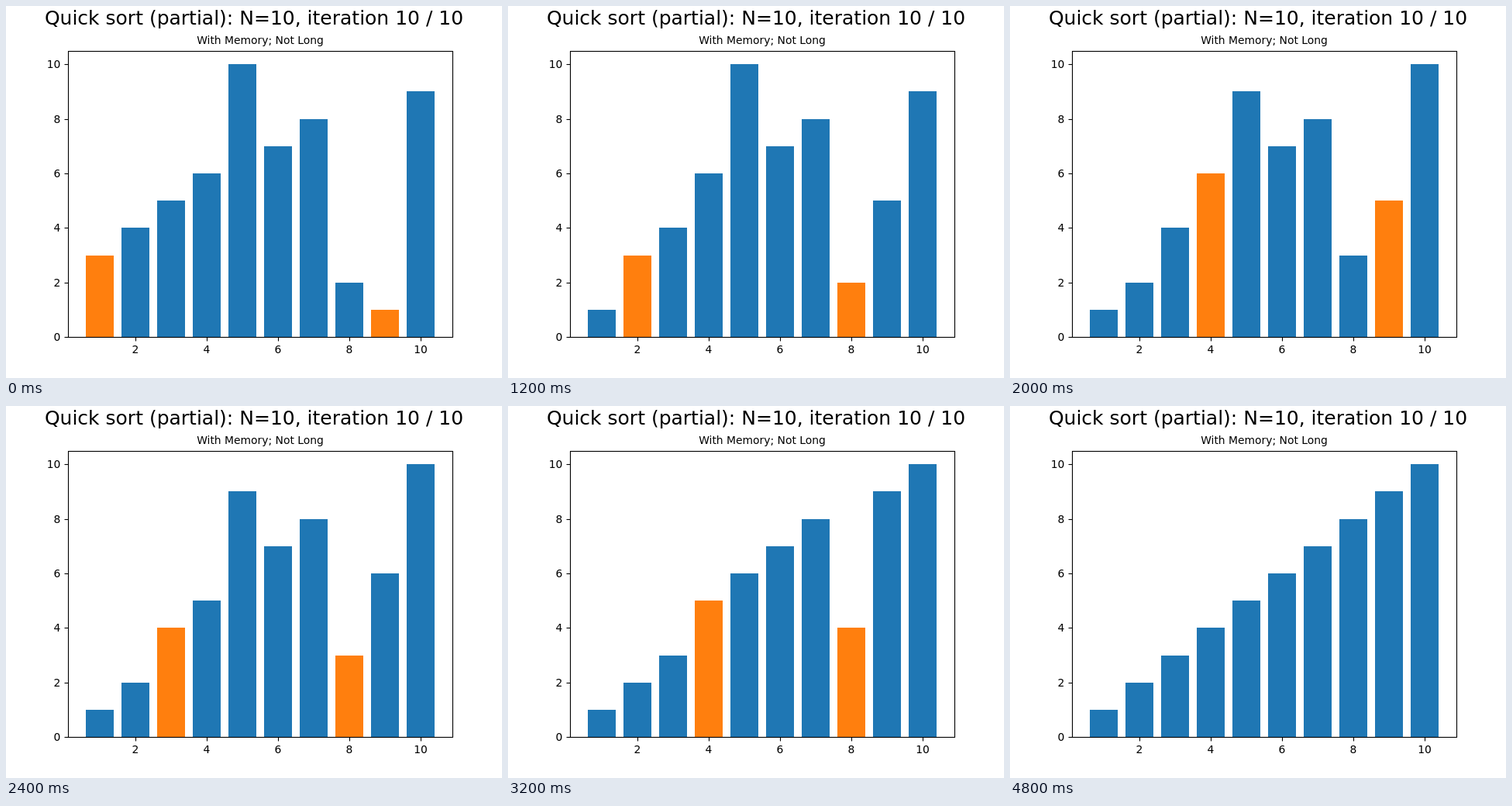
An HTML page with a canvas that plays this animation: 640 by 480 pixels, repeating every 5.2 s.

```html
<!DOCTYPE html>
<html lang="en">
<head>
<meta charset="utf-8">
<title>Quick sort</title>
<style>
  html, body { margin: 0; width: 100%; height: 100%; overflow: hidden; background: #fff; }
  canvas { display: block; }
</style>
</head>
<body>
<canvas id="chart" width="640" height="480"></canvas>
<script>
const ctx = document.getElementById('chart').getContext('2d');
const STEP_MS = 400;
const START = [3, 4, 5, 6, 10, 7, 8, 2, 1, 9];
// Positions (from 1) exchanged at each step; each pair is highlighted before its swap.
const SWAPS = [[1, 9], [2, 9], [3, 9], [2, 8], [5, 10], [4, 9],
               [3, 8], [5, 9], [4, 8], [5, 8], [6, 8], [7, 8]];
const AXES = { left: 80, right: 576, top: 58, bottom: 427 };

const xAt = position => 75 + 46 * position;
const yAt = value => Math.round(427.2 - 35.2 * value);

function text(string, x, y, size, align = 'center') {
  ctx.font = `${size}px "DejaVu Sans", sans-serif`;
  ctx.textAlign = align;
  ctx.fillText(string, x, y);
}

function line(x1, y1, x2, y2) {
  ctx.beginPath();
  ctx.moveTo(x1 + 0.5, y1 + 0.5);
  ctx.lineTo(x2 + 0.5, y2 + 0.5);
  ctx.stroke();
}

function drawBars(step) {
  const values = [...START];
  for (const [a, b] of SWAPS.slice(0, step)) {
    [values[a - 1], values[b - 1]] = [values[b - 1], values[a - 1]];
  }
  const active = SWAPS[step] || [];
  values.forEach((value, i) => {
    const top = yAt(value);
    ctx.fillStyle = active.includes(i + 1) ? '#ff7f0e' : '#1f77b4';
    ctx.fillRect(xAt(i + 1) - 18, top, 36, AXES.bottom - top);
  });
}

function drawAxes() {
  const { left, right, top, bottom } = AXES;
  const labelSize = 13.889;
  ctx.fillStyle = ctx.strokeStyle = '#000';
  ctx.lineWidth = 1.11;
  ctx.strokeRect(left + 0.5, top + 0.5, right - left, bottom - top);
  for (let n = 0; n <= 10; n += 2) {
    const y = yAt(n);
    line(left - 5, y, left, y);
    text(n, 70.3, y + 5, labelSize, 'right');
    if (n > 0) {
      line(xAt(n), bottom, xAt(n), bottom + 5);
      text(n, xAt(n), 448, labelSize);
    }
  }
  text('Quick sort (partial): N=10, iteration 10 / 10', 320, 24, 25);
  text('With Memory; Not Long', 328, 49, labelSize);
}

function draw(now) {
  const step = Math.floor(now / STEP_MS) % (SWAPS.length + 1);
  ctx.fillStyle = '#fff';
  ctx.fillRect(0, 0, 640, 480);
  drawBars(step);
  drawAxes();
}

let startTime;
function tick(now) {
  startTime ??= now;
  draw(now - startTime);
  requestAnimationFrame(tick);
}
draw(0);
requestAnimationFrame(tick);
</script>
</body>
</html>
```
